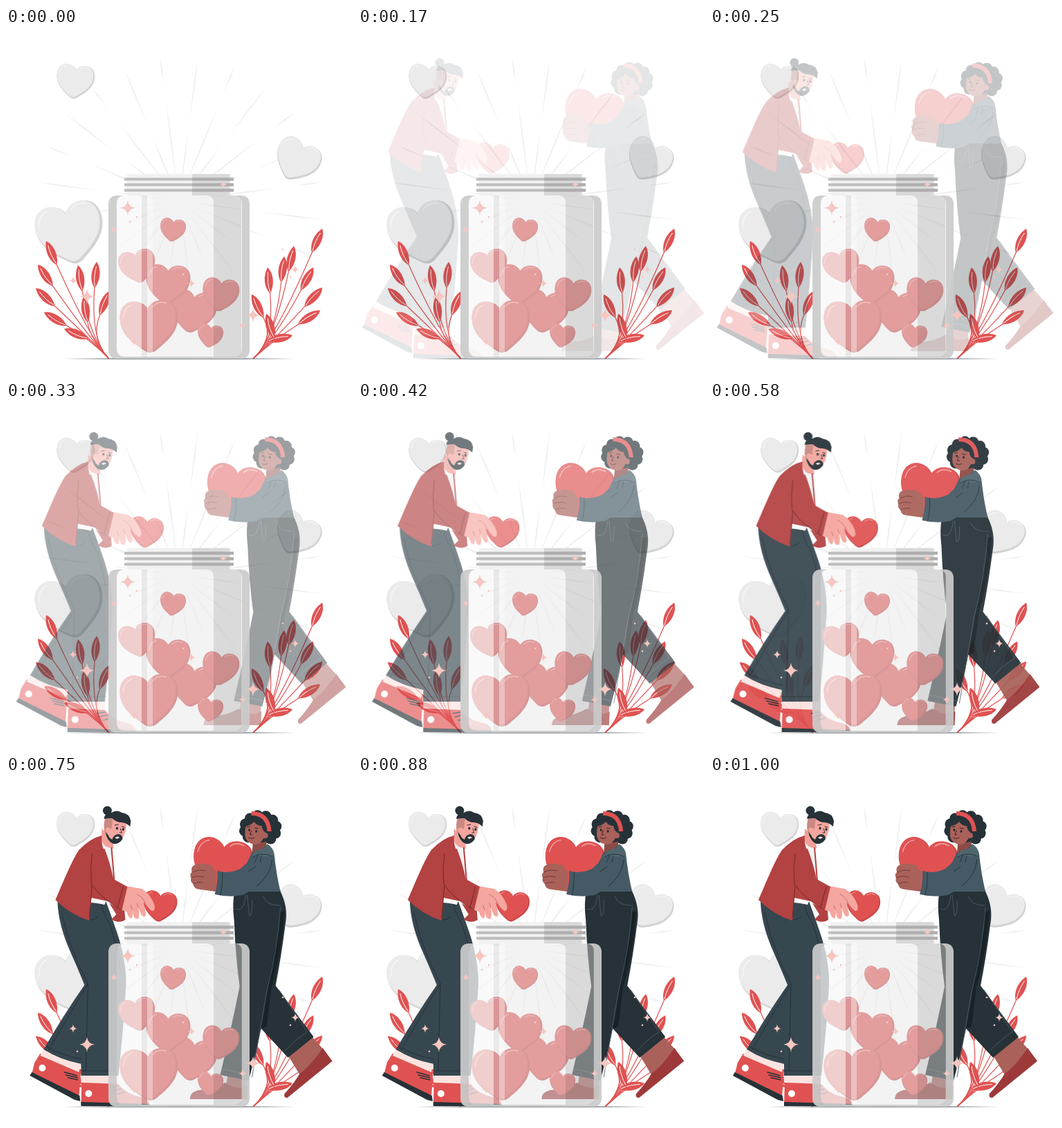
Write an HTML page that moves like this. It is 500 by 500 pixels and loops after 1040 ms.

```html
<!DOCTYPE html>
<html lang="en">
<head>
<meta charset="utf-8">
<title>Jar of hearts</title>
<style>
  html, body { margin: 0; width: 100%; height: 100%; overflow: hidden; background: #fff; }
  svg { display: block; width: 100%; height: 100%; }
  .line { fill: none; stroke-linecap: round; stroke-linejoin: round; }
</style>
</head>
<body>
<svg viewBox="0 0 500 500">
  <g id="back"></g>
  <path d="M82 478Q250 476.4 420 478Q250 479.2 82 478Z" fill="#263238"/>

  <g id="man">
    <!-- rear leg and shoe -->
    <path d="M48 401L40 414L36 430L104 465L107 424Z" fill="#e05252"/>
    <path d="M36 428L105 462L106 470L98 468L33 433Z" fill="#263238"/>
    <path d="M53 396L48 404L104 428L107 415Z" fill="#fbe3e0"/>
    <circle cx="51" cy="422" r="5" fill="#fff"/>
    <path d="M83 428l18 5M85 432l17 4M88 436l14 3" class="line" stroke="#263238" stroke-width="1.5"/>
    <path d="M73 181Q74 215 92 255Q104 282 112 302Q82 345 53 395Q76 410 107 416L140 330V190Z" fill="#37474f"/>
    <!-- front leg and shoe -->
    <path d="M108 442L160 444Q172 460 194 464Q205 467 206 475H107Z" fill="#e05252"/>
    <path d="M107 471L206 474V477H107Z" fill="#263238"/>
    <path d="M107 432H161V445L107 443Z" fill="#fbe3e0"/>
    <circle cx="118" cy="459" r="5" fill="#fff"/>
    <path d="M150 450l12 -2M153 455l12 -3M158 460l12 -3" class="line" stroke="#263238" stroke-width="1.5"/>
    <path d="M106 190L120 177L143 181Q150 200 159 226Q173 268 172 303Q168 370 161 433H107V338L115 301Z" fill="#37474f"/>
    <path d="M120 208Q127 208 132 203M136 184Q139 200 149 215Q160 248 164 280M79 197Q90 250 117 300L114 426M117 300Q88 348 60 397M57 391Q80 404 107 409M107 426H161" class="line" stroke="#222f36" stroke-width=".9"/>
    <path d="M121 176L143 181L141 186Q128 183 120 183Z" fill="#fff"/>
    <!-- body -->
    <path d="M137 76L136 96L147 110L154 104L153 90Z" fill="#f1a099"/>
    <path d="M136 92Q140 104 151 104L156 152L146 152L134 104Z" fill="#f2f2f2"/>
    <path d="M151 104Q153 125 155 152" class="line" stroke="#b34242" stroke-width="2"/>
    <path d="M137 86Q120 90 104 107C93 123 82 152 70 179Q91 200 119 209L122 176L146 181L148 145L140 107Q136 98 137 86Z" fill="#b34242"/>
    <path d="M148 184L170 195L171 208Q161 214 151 207L158 200Z" fill="#b34242"/>
    <g id="small"></g>
    <path d="M172 159L195 163Q207 170 213 186Q215 195 210 195Q206 193 201 186L197 182Q200 194 201 201Q197 206 194 200L190 190Q192 200 190 206Q185 208 183 202L181 193Q183 200 180 206Q175 205 173 196L163 192Z" fill="#f5a69e"/>
    <path d="M188 171Q196 174 201 186M190 190L188 184M181 193L179 187" class="line" stroke="#b76862" stroke-width=".8"/>
    <path d="M124 108Q119 130 122 156Q134 175 166 194L174 160L154 149Q149 125 141 105Z" fill="#b34242"/>
    <path d="M123 113Q120 135 122 156Q134 175 164 193M123 158L119 205M168 160L160 190" class="line" stroke="#6e2525" stroke-width=".9"/>
    <!-- head -->
    <path d="M143 65Q138 76 143 85Q148 97 158 97Q168 95 172 77L173 66L158 60Z" fill="#f5a69e"/>
    <path d="M142 61H153L151 76Q146 77 145 83L141 80Q139 69 142 61Z" fill="#c98982"/>
    <path d="M142 81Q146 84 148 89L152 92Q154 85 160 84Q167 84 167 91Q162 99 154 98Q145 95 142 81Z" fill="#263238"/>
    <path d="M156 89Q160 86 163 89L159 91Z" fill="#fbe3e0"/>
    <circle cx="146" cy="78" r="3.6" fill="#f5a69e"/>
    <path d="M159 75v1M168 76.500v1" class="line" stroke="#263238" stroke-width="3"/>
    <path d="M156 71l5 -1M166 73l4 1M164 76l2 6h-3" class="line" stroke="#263238"/>
    <circle cx="145" cy="50" r="6.500" fill="#263238"/>
    <path d="M140 62Q141 53 151 53Q159 48 166 53Q177 54 179 65L178 73Q171 66 163 67Q157 66 152 61H147Z" fill="#263238"/>
  </g>

  <g id="woman">
    <!-- rear leg and shoe -->
    <path d="M408 402L442 375L460 395L429 437Z" fill="#a9615a"/>
    <path d="M426 430Q441 420 459 393L473 412L408 465Q402 465 404 459Q417 445 426 430Z" fill="#9d3939"/>
    <path d="M397 165C404 178 409 195 405 215Q399 262 391 303L446 377L409 407L371 366L350 220Z" fill="#263238"/>
    <path d="M404 195Q399 260 385 305L378 362L369 366L376 200Z" fill="#192226"/>
    <!-- front leg and shoe -->
    <path d="M322 430H351L349 458H318Z" fill="#a9615a"/>
    <path d="M318 443Q302 453 279 454Q267 457 267 467H350L351 447Q338 456 318 443Z" fill="#9d3939"/>
    <path d="M332 165Q328 184 331 208Q333 260 339 304Q330 350 311 432L352 440Q372 367 380 305L396 220L398 165Z" fill="#263238"/>
    <path d="M398 190Q394 250 378 312L357 435M333 192Q345 198 348 172M350 172L353 202Q358 203 357 180M373 174Q378 188 398 187M396 309L437 370Q420 380 404 398M313 423L354 432" class="line" stroke="#4c5b63" stroke-width=".9"/>
    <!-- body -->
    <g id="large"></g>
    <path d="M359 87L357 111L373 116L379 94Z" fill="#8c4b46"/>
    <path d="M357 110Q370 112 377 99L389 113Q392 142 398 167H331L340 145Z" fill="#455a64"/>
    <path d="M306 140L298 129Q284 124 273 129Q268 132 270 139Q266 142 269 147Q267 153 272 156Q272 163 282 164L304 167Z" fill="#a9615a"/>
    <path d="M271 139Q280 134 289 137M269 147Q279 143 287 146M272 156Q280 152 286 154" class="line" stroke="#6d3732" stroke-width=".9"/>
    <path d="M307 137Q324 142 340 134L357 119Q374 105 386 115Q389 130 378 147Q362 162 344 172Q324 176 303 171Q308 154 307 137Z" fill="#455a64"/>
    <path d="M357 117Q359 106 374 105L379 98Q388 104 389 113Q382 119 366 115Z" fill="#50666f"/>
    <path d="M386 121Q384 143 364 159M314 139Q315 157 311 172M352 138L362 131M365 114L361 125M371 115L369 124M358 117Q371 109 386 116" class="line" stroke="#22323b" stroke-width=".9"/>
    <!-- head -->
    <g id="curls" fill="#263238"></g>
    <path d="M350 66Q346 76 347 87Q349 96 357 98Q366 101 371 94Q377 87 378 71L365 61Z" fill="#a9615a"/>
    <circle cx="376" cy="86" r="4" fill="#a9615a"/>
    <path d="M347 73Q347 60 359 58Q374 58 380 72L378 82Q372 80 371 72Q364 72 360 66Q356 71 347 73Z" fill="#263238"/>
    <path d="M356 54Q380 54 382 80" fill="none" stroke="#e05252" stroke-width="6"/>
    <path d="M353 77.500v1M363 79.500v1" class="line" stroke="#1d2529" stroke-width="2.600"/>
    <path d="M350 74l4 -1M361 75l5 1M356 79l-2 6h3M352 89q4 3 8 0" class="line" stroke="#3d211f"/>
  </g>

  <g id="inside"></g>
  <!-- glass -->
  <rect x="148" y="242" width="204" height="236" rx="13" fill="#e8e8e8" opacity=".5"/>
  <path d="M290 242H340V475H300V252Q300 242 290 242Z" opacity=".1"/>
  <path d="M172 242H196V475H170Q160 475 160 464V254Q160 242 172 242Z" fill="#fff" opacity=".5"/>
  <path d="M196 242H204V475H196Z" opacity=".04"/>
  <path d="M204 242H212V475H204Z" fill="#fff" opacity=".35"/>
  <path fill-rule="evenodd" fill="#c9c9c9" opacity=".85" d="M161 242H339Q352 242 352 255V465Q352 478 339 478H161Q148 478 148 465V255Q148 242 161 242ZM172 242Q160 242 160 254V463Q160 475 172 475H329Q341 475 341 463V254Q341 242 329 242Z"/>
  <!-- neck -->
  <rect x="175" y="211" width="150" height="31" fill="#f0f0f0" opacity=".85"/>
  <rect x="269" y="211" width="54" height="31" fill="#d3d3d3" opacity=".8"/>
  <path d="M171 218.500H329M171 226.500H329M171 234.500H329" stroke="#bdbdbd" stroke-width="4"/>
  <path d="M269 218.500H329M269 226.500H329M269 234.500H329" stroke="#adadad" stroke-width="4"/>
  <g id="sparkles" fill="#f6c6c0"></g>
</svg>
<script>
const $ = id => document.getElementById(id);
const repeat = (n, make) => Array.from({ length: n }, (_, i) => make(i)).join('');
const red = '#e05252';
const outline = 'M0-26C-10-48-50-48-50-12C-50 16-26 32-9 45Q0 51 9 45C26 32 50 16 50-12C50-48 10-48 0-26Z';

const heart = (x, y, width, turn, fill = red, shade = '#c84848') =>
  `<g transform="translate(${x} ${y}) rotate(${turn}) scale(${width / 100})">
    <path d="${outline}" fill="${shade}"/>
    <path d="${outline}" fill="${fill}" transform="translate(-1.800 -2.200) scale(.96)"/>
    <path d="M8-31Q17-41 31-36M-44-14Q-42-32-28-36" class="line" stroke="#fff" stroke-width="1.6" opacity=".5"/>
  </g>`;

const ray = (angle, r1, r2) =>
  `<path d="M${r1} 0L${r1 * .4 + r2 * .6}-1L${r2} 0L${r1 * .4 + r2 * .6} 1Z" fill="#eee" transform="translate(250 250) rotate(${angle})"/>`;

// Long and short rays alternate; the outer ones open upwards
const rays = repeat(24, i => {
  const angle = i * 15 - 82.5, long = i % 2;
  return ray(angle, 12, long ? 145 : 100) + (i < 8 || i > 17 ? ray(angle, long ? 168 : 115, 210) : '');
});

// Every leaf points away from the fork, where its stem bends down to the root
const plant = (rootX, forkX, tips) => tips.map(([x, y]) => {
  const forkY = 450, length = 38, a = Math.atan2(y - forkY, x - forkX);
  const baseX = x - length * Math.cos(a), baseY = y - length * Math.sin(a);
  return `<path d="M${baseX} ${baseY}Q${forkX} ${forkY} ${rootX} 477" class="line" stroke="${red}" stroke-width="1.2"/>
    <g transform="translate(${baseX} ${baseY}) rotate(${a * 180 / Math.PI})">
      <path d="M0 0C10-8 26-8 ${length} 0C29 8 12 8 0 0Z" fill="${red}"/>
      <path d="M3 0Q16-3 31 0" class="line" stroke="#fff" stroke-width=".9"/></g>`;
}).join('');

const star = (x, y, r) =>
  `<path transform="translate(${x} ${y}) scale(${r / 10})" d="M0-10Q1-1 10 0Q1 1 0 10Q-1 1-10 0Q-1-1 0-10Z"/>`;
const dot = (x, y) => `<circle cx="${x}" cy="${y}" r="1.300"/>`;

const grey = ['#ebebeb', '#d2d2d2'];
$('back').innerHTML = rays +
  heart(100, 76, 55, 7, ...grey) + heart(421, 190, 66, 28, ...grey) + heart(93, 294, 98, -12, ...grey) +
  plant(148, 122, [[58, 308], [46, 342], [43, 376], [55, 411], [84, 435], [104, 343], [131, 338], [149, 380], [112, 388]]) +
  plant(358, 388, [[457, 290], [416, 315], [402, 330], [378, 346], [444, 346], [457, 375], [454, 408], [414, 444], [355, 385], [376, 413]]);

$('small').innerHTML = heart(221, 187, 49, 7);
$('large').innerHTML = heart(314, 127, 86, 9);
$('curls').innerHTML = repeat(10, i => {
  const a = (140 + i * 30) * Math.PI / 180;
  return `<circle cx="${369 + 23 * Math.cos(a)}" cy="${76 + 19 * Math.sin(a)}" r="8"/>`;
}) + '<circle cx="369" cy="76" r="20"/>';

$('inside').innerHTML = heart(190, 343, 53, -11) + heart(270, 408, 68, 10) + heart(234, 369, 64, 4) +
  heart(310, 384, 53, 8) + heart(207, 429, 84, -3) + heart(295, 444, 37, 9) + heart(241, 291, 37, 8);

$('sparkles').innerHTML =
  star(176, 260, 11) + star(117, 388, 11) + star(357, 415, 10) +
  [[156, 291], [314, 226], [97, 365], [268, 369], [185, 453], [342, 430], [418, 349]].map(p => star(...p, 6)).join('') +
  [[189, 273], [179, 280], [400, 320], [411, 360], [103, 398], [256, 356]].map(p => dot(...p)).join('');

// cubic-bezier(.36, -.01, .5, 1.38)
const bezier = (a, b, s) => 3 * a * s * (1 - s) ** 2 + 3 * b * s * s * (1 - s) + s ** 3;
function ease(x) {
  let lo = 0, hi = 1;
  for (let i = 0; i < 30; i++) {
    const mid = (lo + hi) / 2;
    bezier(.36, .5, mid) < x ? lo = mid : hi = mid;
  }
  return bezier(-.01, 1.38, lo);
}

// The fade runs slightly ahead of the slide
function pose(id, shift, p) {
  const left = Math.min(1, 1 - p);
  $(id).setAttribute('transform', `translate(${shift * left} 0)`);
  $(id).setAttribute('opacity', 1 - Math.max(0, left) ** 1.25);
}

const start = performance.now();
function draw() {
  const t = (performance.now() - start) % 1040;
  const step = Math.floor((t + 5.1) * .024); // 24 steps a second
  const p = ease(Math.min(1, step / 24));
  pose('man', -30, p);
  pose('woman', 30, p);
  requestAnimationFrame(draw);
}
draw();
</script>
</body>
</html>
```
